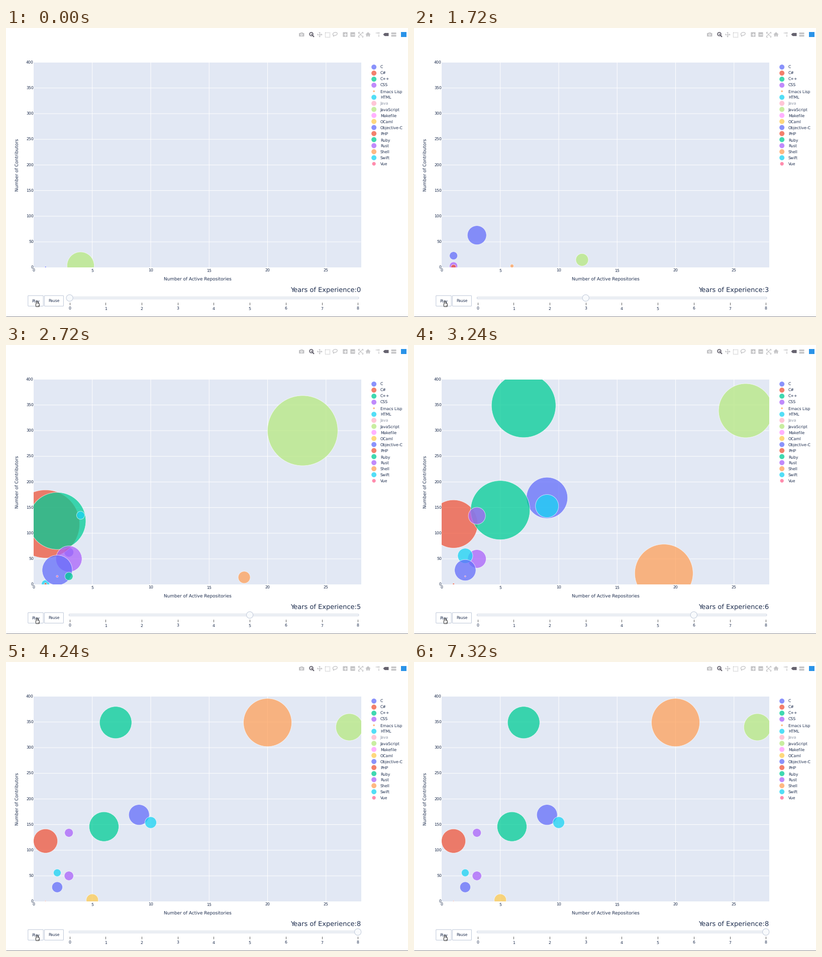
Write a matplotlib script that moves like this. It is 800x577 px and loops after 7360 ms.

```python
import matplotlib.pyplot as plt
from matplotlib.animation import FuncAnimation
from matplotlib.patches import Circle, Ellipse, FancyBboxPatch, Polygon, Rectangle

W, H, DPI = 800, 577, 64
FRAMES, STEP = 184, 40
YEAR_MS, TWEEN_MS, LEAD_MS = 504, 300, 100
LAST_YEAR = 8
X0, X1, Y0, Y1 = 55.4, 706.6, 68.6, 478.2
INK, RAIL, PALE = "#1d2d4e", "#bec8d9", "#f8fafc"
ICON, ACTIVE = "#c4c4c6", "#66636f"
PALETTE = ["#636efa", "#ef553b", "#00cc96", "#ab63fa", "#ffa15a",
           "#19d3f3", "#ff6692", "#b6e880", "#ff97ff", "#fecb52"]
LANGUAGES = ["C", "C#", "C++", "CSS", "Emacs Lisp", "HTML", "Java", "JavaScript",
             "Makefile", "OCaml", "Objective-C", "PHP", "Ruby", "Rust", "Shell",
             "Swift", "Vue"]
LEGEND_R = {"Emacs Lisp": 1.8, "Vue": 3.6}

# Bursts of activity: (year, repositories, contributors[, radius]).
# After a burst the bubble stays put and its area halves every year.
FIRST_RADIUS = 8
BURSTS = {
    "C": [(0, 1, 1, 1.5), (3, 3, 63, 19), (6, 9, 169, 41)],
    "C#": [(5, 1, 118, 68)],
    "C++": [(5, 2, 124, 57), (6, 5, 145, 59)],
    "CSS": [(3, 1, 3), (5, 3, 50, 26)],
    "HTML": [(5, 1, 1), (6, 2, 56, 15)],
    "JavaScript": [(0, 4, 4, 27), (3, 12, 15, 12.5), (5, 23, 300, 70), (6, 26, 339, 54)],
    "OCaml": [(8, 5, 3, 12)],
    "Objective-C": [(3, 1, 23), (5, 2, 28, 30)],
    "PHP": [(3, 1, 1, 5)],
    "Ruby": [(5, 3, 16), (6, 7, 349, 64)],
    "Rust": [(6, 3, 134, 17)],
    "Shell": [(3, 6, 3, 3.5), (5, 18, 14, 12), (6, 19, 22, 58), (8, 20, 349, 48)],
    "Swift": [(5, 4, 135), (6, 9, 153, 23)],
    "Vue": [(5, 2, 16, 1.9)],
}
# These gain one more repository and contributor after their last burst.
STILL_GROWING = {"C++", "JavaScript", "Swift"}

plt.rcParams.update({"font.family": "DejaVu Sans", "text.hinting": "no_hinting",
                     "toolbar": "None"})
fig = plt.figure(figsize=(W / DPI, H / DPI), dpi=DPI, facecolor="white")
ax = fig.add_axes([0, 0, 1, 1])
ax.set(xlim=(0, W), ylim=(H, 0))
ax.axis("off")


def pt(px):
    return px * 72 / DPI


def px_x(v):
    return X0 + v * (X1 - X0) / 28


def px_y(v):
    return Y1 - v * (Y1 - Y0) / 400


def knob_x(year):
    return 126.6 + 71.7 * year


def text(x, y, s, size=7.8, ha="center", color=INK, **kw):
    kw.setdefault("va", "center_baseline")
    return ax.text(x, y, s, fontsize=pt(size), ha=ha, color=color, **kw)


def line(xs, ys, color, lw=1.0, **kw):
    ax.plot(xs, ys, color=color, lw=pt(lw), solid_capstyle="butt", **kw)


def add(patch, fc="none", ec="none", lw=1.0, **kw):
    patch.set(facecolor=fc, edgecolor=ec, linewidth=pt(lw), **kw)
    return ax.add_patch(patch)


def box(x, y, w, h, r=0, **kw):
    if r:
        shape = FancyBboxPatch((x, y), w, h, boxstyle=f"round,pad=0,rounding_size={r}")
    else:
        shape = Rectangle((x, y), w, h)
    return add(shape, **kw)


def plus(x, y, r, color, lw, upright=True):
    line([x - r, x + r], [y, y], color, lw)
    if upright:
        line([x, x], [y - r, y + r], color, lw)


def draw_modebar(y=13):
    # camera
    box(583, y - 3, 10.5, 7, 1, fc=ICON)
    box(586, y - 4.2, 4.5, 3, fc=ICON)
    add(Circle((588.2, y + 0.4), 1.7), ICON, "white")
    # zoom
    add(Circle((607.5, y - 0.8), 3.4), ec=ACTIVE, lw=1.7)
    line([610, 613], [y + 1.8, y + 4.8], ACTIVE, 2.2)
    plus(607.5, y - 0.8, 1.7, ACTIVE, 1)
    # pan
    plus(624, y, 4.5, ICON, 1.2)
    for dx, dy in ((1, 0), (-1, 0), (0, 1), (0, -1)):
        bx, by = 624 + 3 * dx, y + 3 * dy
        add(Polygon([(624 + 5.2 * dx, y + 5.2 * dy), (bx + 2 * dy, by + 2 * dx),
                     (bx - 2 * dy, by - 2 * dx)]), ICON)
    # box and lasso select
    box(634.5, y - 4.5, 9, 9, ec=ICON, lw=1.3, linestyle=(0, (1.3, 0.9)))
    add(Ellipse((654.8, y - 1.2), 9, 6, angle=-15), ec=ICON, lw=1.3)
    line([651.5, 651.2, 653], [y + 1, y + 2.8, y + 4.3], ICON, 1.2)
    # zoom in and out
    for x, upright in ((675, True), (690, False)):
        box(x - 4.6, y - 4.6, 9.2, 9.2, 0.8, fc=ICON)
        plus(x, y, 2.6, "white", 1.4, upright)
    # autoscale
    for sx in (-1, 1):
        for sy in (-1, 1):
            line([705.5, 705.5 + 4 * sx], [y, y + 4 * sy], ICON, 1.1)
            line([705.5 + 2 * sx, 705.5 + 4.7 * sx, 705.5 + 4.7 * sx],
                 [y + 4.6 * sy, y + 4.6 * sy, y + 2 * sy], ICON, 1.1)
    # home
    add(Polygon([(715.2, y), (720.5, y - 4.8), (725.8, y)]), ICON)
    box(717, y - 0.5, 7, 4.9, fc=ICON)
    box(719.6, y + 1.2, 1.8, 3.2, fc="white")
    # spike lines
    for i in range(2):
        box(735.8 + 2.6 * i, y - 3.8, 1.5, 1.5, fc=ICON)
        box(741.2, y - 0.4 + 2.8 * i, 1.5, 1.5, fc=ICON)
    add(Circle((742, y - 3), 1.4), ICON)
    # hover labels
    add(Polygon([(750.5, y), (753.6, y - 3.1), (761.5, y - 3.1),
                 (761.5, y + 3.1), (753.6, y + 3.1)]), ACTIVE)
    for dy in (-4, 0.8):
        box(766.6, y + dy, 10, 3.4, 0.6, fc=ICON)
    box(786.3, y - 5.2, 10.6, 10.4, fc="#2a93e8")


def draw_plot():
    box(X0, Y0, X1 - X0, Y1 - Y0, fc="#e2e8f4")
    for v in range(0, 26, 5):
        if v:
            line([px_x(v)] * 2, [Y0, Y1], "white", zorder=1.5, snap=False)
        text(px_x(v), 484, str(v))
    for v in range(0, 401, 50):
        if 0 < v < 400:
            line([X0, X1], [px_y(v)] * 2, "white", zorder=1.5, snap=False)
        text(54.9, px_y(v), str(v), ha="right")
    text(381, 500.6, "Number of Active Repositories", 8.93)
    text(22.4, 273.3, "Number of Contributors", 8.9, rotation=90, va="center")


def draw_legend():
    for i, name in enumerate(LANGUAGES):
        y = 78 + 12.07 * i
        fade = 0.5 if name == "Java" else 1
        add(Circle((732.2, y), LEGEND_R.get(name, 5)), PALETTE[i % 10], alpha=0.75 * fade)
        text(744.8, y, name, ha="left", alpha=fade)


def draw_controls():
    for x, w, label in ((43.8, 30.4, "Play"), (76.4, 38, "Pause")):
        box(x, 534.3, w, 21, 1, fc="white", ec=RAIL)
        text(x + w / 2, 544.3, label, 7.6)
    box(125.3, 537.2, 576.7, 3.6, 1.5, fc=PALE, ec=RAIL, lw=0.8)
    for year in range(LAST_YEAR + 1):
        x = knob_x(year)
        line([x, x], [548.3, 552.8], "#333333", 0.8)
        text(x, 560, str(year))
    line([0, W], [576.4, 576.4], "#8b8b90")


def draw_cursor():
    # pointing hand: outline of palm and finger, then their white inside
    for pad, color in ((0.9, "#111111"), (0, "white")):
        for x, y, w, h in ((59.8, 550.2, 6, 5.6), (61.2, 546, 1.5, 6)):
            box(x - pad, y - pad, w + 2 * pad, h + 2 * pad, 0.7 + pad, fc=color, zorder=9)
    for x in (62.3, 63.6, 64.9):
        line([x, x], [552.5, 555], "#333333", 0.5, zorder=10)


def state(name, year):
    bursts = BURSTS.get(name, [])
    past = [b for b in bursts if b[0] <= year]
    if not past:
        return None
    start, x, y, r = (*past[-1], FIRST_RADIUS)[:4]
    if name in STILL_GROWING and year > bursts[-1][0]:
        x, y = x + 1, y + 1
    r *= 2 ** ((start - year) / 2)
    return (x, y, r) if r > 0.7 else None


def ease(t, power):
    if t < 0.5:
        return (2 * t) ** power / 2
    return 1 - (2 - 2 * t) ** power / 2


draw_modebar()
draw_plot()
draw_legend()
draw_controls()
draw_cursor()

clip = Rectangle((X0, Y0), X1 - X0, Y1 - Y0, transform=ax.transData)
bubbles = {}
for i, name in enumerate(LANGUAGES):
    bubbles[name] = add(Circle((0, 0), 1), PALETTE[i % 10], "white", 0.8, zorder=3 + i / 100)
    bubbles[name].set_clip_path(clip)
knob = add(Circle((knob_x(0), 539), 6.6), PALE, RAIL, 0.9, zorder=5)
caption = text(706.6, 522, "", 13, ha="right")


def update(frame):
    ms = frame * STEP + LEAD_MS
    year = min(ms // YEAR_MS, LAST_YEAR)
    t = min((ms - year * YEAR_MS) / TWEEN_MS, 1)
    prev = max(year - 1, 0)
    e = ease(t, 2)
    for name, bubble in bubbles.items():
        a, b = state(name, prev), state(name, year)
        fade = (1 - e) * (a is not None) + e * (b is not None)
        bubble.set_visible(fade > 0)
        if fade > 0:
            a, b = a or b, b or a
            x, y, r = (p + (q - p) * e for p, q in zip(a, b))
            bubble.set(center=(px_x(x), px_y(y)), radius=r, alpha=0.75 * fade)
    knob.set_center((knob_x(prev + (year - prev) * ease(t, 3)), 539))
    caption.set_text(f"Years of Experience:{year}")
    return [*bubbles.values(), knob, caption]


anim = FuncAnimation(fig, update, frames=FRAMES, interval=STEP, repeat=True,
                     repeat_delay=0, blit=False)
plt.show()
```
